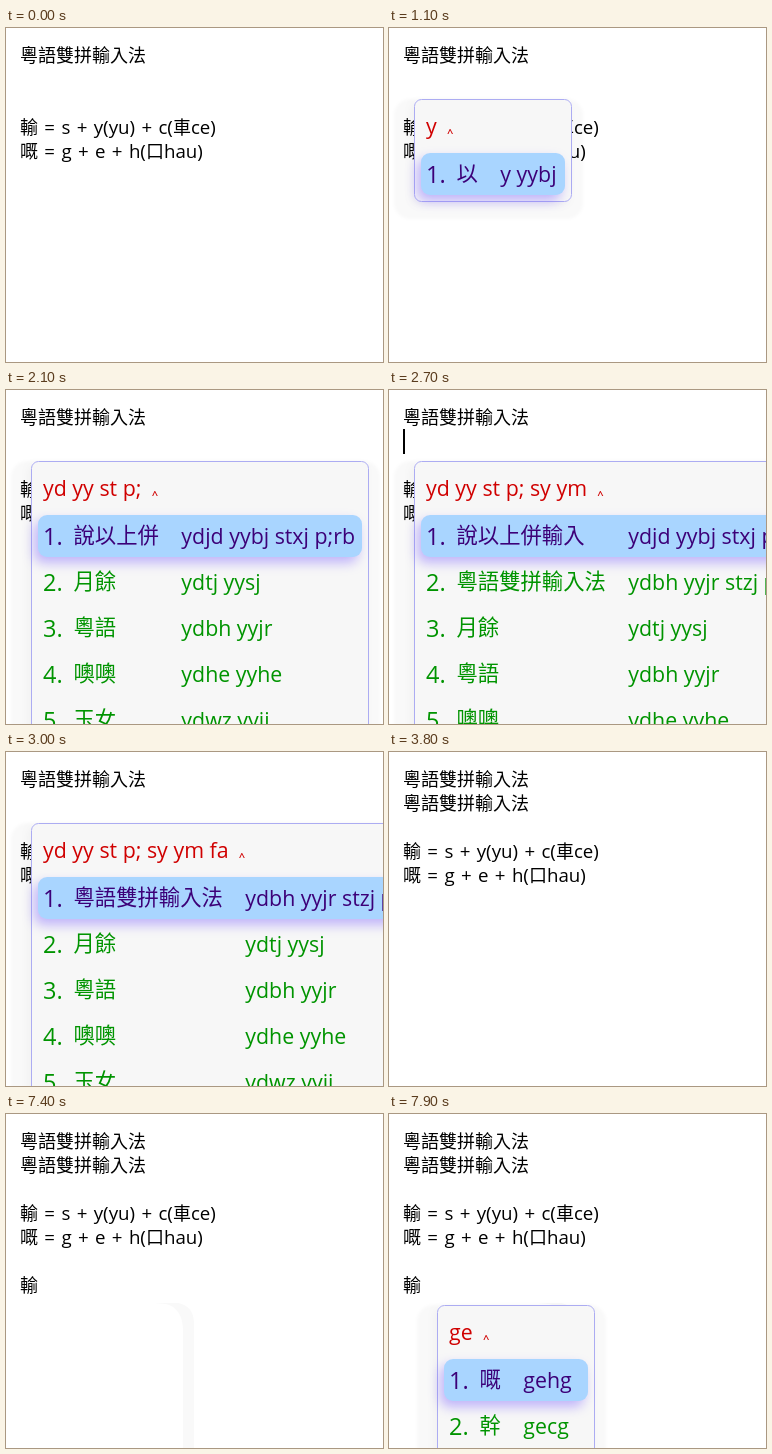
Recreate the animation shown at these times as an HTML page. Size 377 px wide and 334 px high, loop 8 s.

```html
<!DOCTYPE html>
<html lang="zh-Hant">
<head>
<meta charset="utf-8">
<style>
html, body { margin: 0; width: 100%; height: 100%; overflow: hidden; background: #fff; }
svg { display: block; width: 377px; height: 334px; }
text { white-space: pre; font-family: "Open Sans", "Noto Sans CJK TC", "Noto Sans CJK", sans-serif; }
.doc { font-size: 18px; }
.latin { font-size: 18.7px; word-spacing: 1.5px; }
.halo { fill: rgba(0, 0, 0, .025); filter: blur(1.5px); }
.panel { fill: #f7f7f7; stroke: #acacf2; filter: drop-shadow(-3px 3px 4px rgba(0, 0, 0, .03)); }
.pick { fill: #a9d5ff; filter: drop-shadow(-4px 6px 6px rgba(110, 80, 255, .4)); }
.input { fill: #d00000; }
.mark { font-size: 11px; font-weight: 600; }
#popup text { font-size: 21.33px; }
#popup .num { font-size: 23.5px; }
.word { font-weight: 300; }
.row { fill: #009400; }
.row.on { fill: #3c0078; }
</style>
</head>
<body>
<svg viewBox="0 0 377 334">
  <path id="trace" fill="#f9f9f9" d="M148 189H172Q188 192 188 210V334H177V215Q176 194 160 190Z"/>
  <g id="doc" class="doc"></g>
  <rect id="caret" width="2" height="25"/>
  <g id="popup"></g>
</svg>
<script>
const $ = id => document.getElementById(id);
const LOOP = 8000, PITCH = 21.33;
const phrase = '粵語雙拼輸入法';

const moonLeft = '月餘 ydtj yysj', canto = '粵語 ydbh yyjr', oh = '噢噢 ydhe yyhe',
      jade = '玉女 ydwz yyjj', realm = '玉宇 ydwz yymj';
const pairs = [moonLeft, canto, oh, jade];
const first = [canto, oh, jade, moonLeft, realm];
const three = ['說以上 ydjd yybj stxj', ...pairs];
const four = ['說以上併 ydjd yybj stxj p;rb', ...pairs];
const five = ['說以上併輸 ydjd yybj stxj p;rb syce', ...pairs];
const whole = phrase + ' ydbh yyjr stzj p;sf syce ymrj fasx';
const six = ['說以上併輸入 ydjd yybj stxj p;rb syce ymrj', whole, ...pairs.slice(0, 3)];
const seven = [whole, ...pairs];

// [time, x, y, width, typed keys, candidates]; only a time closes the popup
const popups = [
  [0],
  [1100, 25, 71, 158, 'y', ['以 y yybj']],
  [1200, 25, 71, 146, 'yd', ['月 ydtj', '粵 ydbh', '玉 ydwz', '說 ydjd', '噢 ydhe']],
  [1300, 25, 71, 225, 'ydy', first],
  [1400, 25, 71, 225, 'yd yy', first],
  [1600, 25, 71, 225, 'yd yys', [moonLeft, canto, oh, jade, realm]],
  [1800, 25, 71, 270, 'yd yy st', three],
  [1900, 25, 71, 270, 'yd yy stp', three],
  [2100, 25, 71, 338, 'yd yy st p;', four],
  [2200, 25, 71, 338, 'yd yy st p;s', four],
  [2400, 25, 71, 400, 'yd yy st p; sy', five],
  [2500, 25, 71, 400, 'yd yy st p; syy', five],
  [2700, 25, 71, 540, 'yd yy st p; sy ym', six],
  [2800, 25, 71, 540, 'yd yy st p; sy ymf', six],
  [3000, 25, 71, 540, 'yd yy st p; sy ym fa', seven],
  [3400],
  [5900, 25, 191, 146, 's', ['是 s sijz']],
  [6000, 25, 191, 154, 'sy', ['書 syyb', '輸 syce', '樹 symc']],
  [6400, 25, 191, 142, 'syc', ['輸 syce', '舒 sycj', '殊 sycd']],
  [6800],
  [7800, 48, 191, 164, 'g', ['個 g gohz']],
  [7900, 48, 191, 158, 'ge', ['嘅 gehg', '幹 gecg', '夾 gejz']]
];

// [time, x, y]; only a time hides the caret
const carets = [
  [0], [200, 14, 39], [800], [1600, 14, 39], [2100], [2500, 14, 39], [3000],
  [3400, 140, 39], [3800], [6400, 14, 159], [6800, 32, 159], [7000, 37, 159], [7400]
];

const at = (list, t) => list.filter(s => s[0] <= t).pop();

const docLine = (text, row) => `<text x="14" y="${34 + 24 * row}">` +
  text.replace(/[ -~]+/g, s => `<tspan class="latin">${s}</tspan>`) + '</text>';

function docMarkup(t) {
  return docLine(phrase, 0) +
    (t >= 3400 ? docLine(phrase, 1) : '') +
    docLine('輸 = s + y(yu) + c(車ce)', 3) +
    docLine('嘅 = g + e + h(口hau)', 4) +
    (t >= 6800 ? docLine('輸', 6) : '');
}

function popupMarkup([, x, y, width, typed, items]) {
  if (!items) return '';
  const height = 57 + 46 * items.length;
  const words = items.map(s => s.split(' ')[0]);
  const codeX = x + 65 + PITCH * Math.max(...words.map(w => w.length));
  const rows = items.map((item, i) => {
    const base = y + 83 + 46 * i, word = words[i];
    return `<g class="row ${i ? '' : 'on'}">
      <text class="num" x="${x + 12}" y="${base + 1}">${i + 1}.</text>
      <text class="word" x="${x + 42.5}" y="${base - 1}">${word}</text>
      <text x="${codeX}" y="${base}">${item.slice(word.length + 1)}</text></g>`;
  });
  return `<rect class="halo" x="${x - 20}" y="${y}" width="${width + 31}" height="${height + 17}" rx="16"/>
    <rect class="panel" x="${x + .5}" y="${y + .5}" width="${width - 1}" height="${height - 1}" rx="7"/>
    <rect class="pick" x="${x + 7}" y="${y + 54}" width="${width - 14}" height="42" rx="9"/>
    <text class="input" x="${x + 12}" y="${y + 35}">${typed}<tspan class="mark" dx="10.5" dy="3">^</tspan></text>
    ${rows.join('')}`;
}

function put(id, markup) {
  const el = $(id);
  if (el.markup !== markup) el.innerHTML = el.markup = markup;
}

function draw() {
  const t = performance.now() % LOOP;
  put('doc', docMarkup(t));
  put('popup', popupMarkup(at(popups, t)));
  const [, x = -9, y = 0] = at(carets, t);
  $('caret').setAttribute('x', x);
  $('caret').setAttribute('y', y);
  $('trace').style.display = t >= 6400 ? '' : 'none';
  requestAnimationFrame(draw);
}
draw();
</script>
</body>
</html>
```
